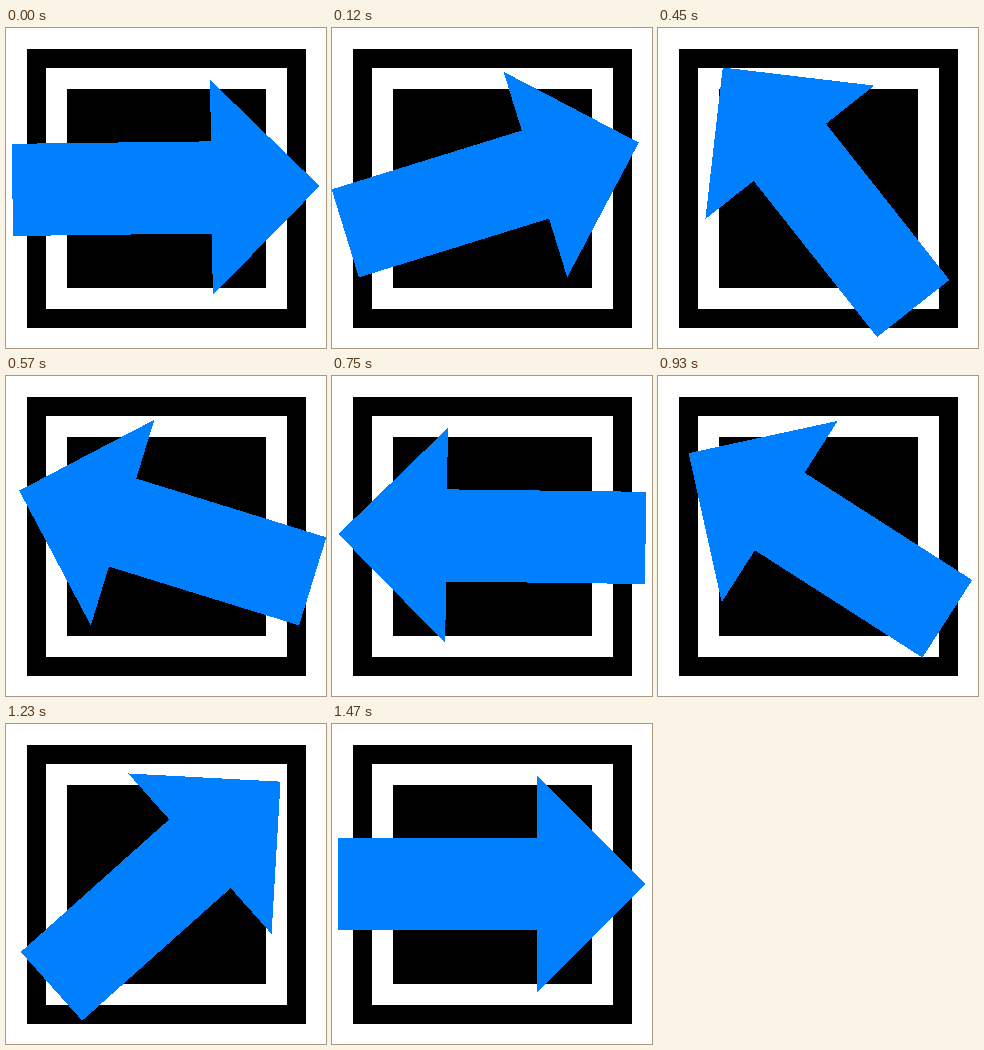
An HTML page that plays this animation: 320x320 px, repeating every 1.5 s.

```html
<!DOCTYPE html>
<html lang="en">
<head>
<meta charset="utf-8">
<title>Swinging arrow</title>
<style>
  html, body { margin: 0; width: 100%; height: 100%; overflow: hidden; background: #fff; }
  svg { display: block; width: 100vw; height: 100vh; }
</style>
</head>
<body>
<svg viewBox="0 0 320 320" shape-rendering="crispEdges">
  <rect x="21" y="21" width="279" height="279"/>
  <rect x="40" y="40" width="241" height="241" fill="#fff"/>
  <rect x="61" y="61" width="199" height="199"/>
  <polygon id="arrow" fill="#0080ff"
    points="-153.6,-46.08 45.45,-46.08 45.45,-107.6 153.6,0 45.45,107.6 45.45,46.08 -153.6,46.08"/>
</svg>
<script>
  const STEP = 30, STEPS = 50;
  const arrow = document.getElementById('arrow');

  // Cosine swing between 0 and 180 degrees, held for each step.
  function draw(time) {
    const step = Math.floor(time / STEP) % STEPS;
    const phase = 2 * Math.PI * (step + 1) / STEPS;
    const angle = 90 * (1 - Math.cos(phase));
    arrow.setAttribute('transform', `translate(160 160) rotate(${-angle})`);
  }

  const start = performance.now();
  function tick() {
    draw(Math.max(0, performance.now() - start));
    requestAnimationFrame(tick);
  }
  tick();
</script>
</body>
</html>
```
